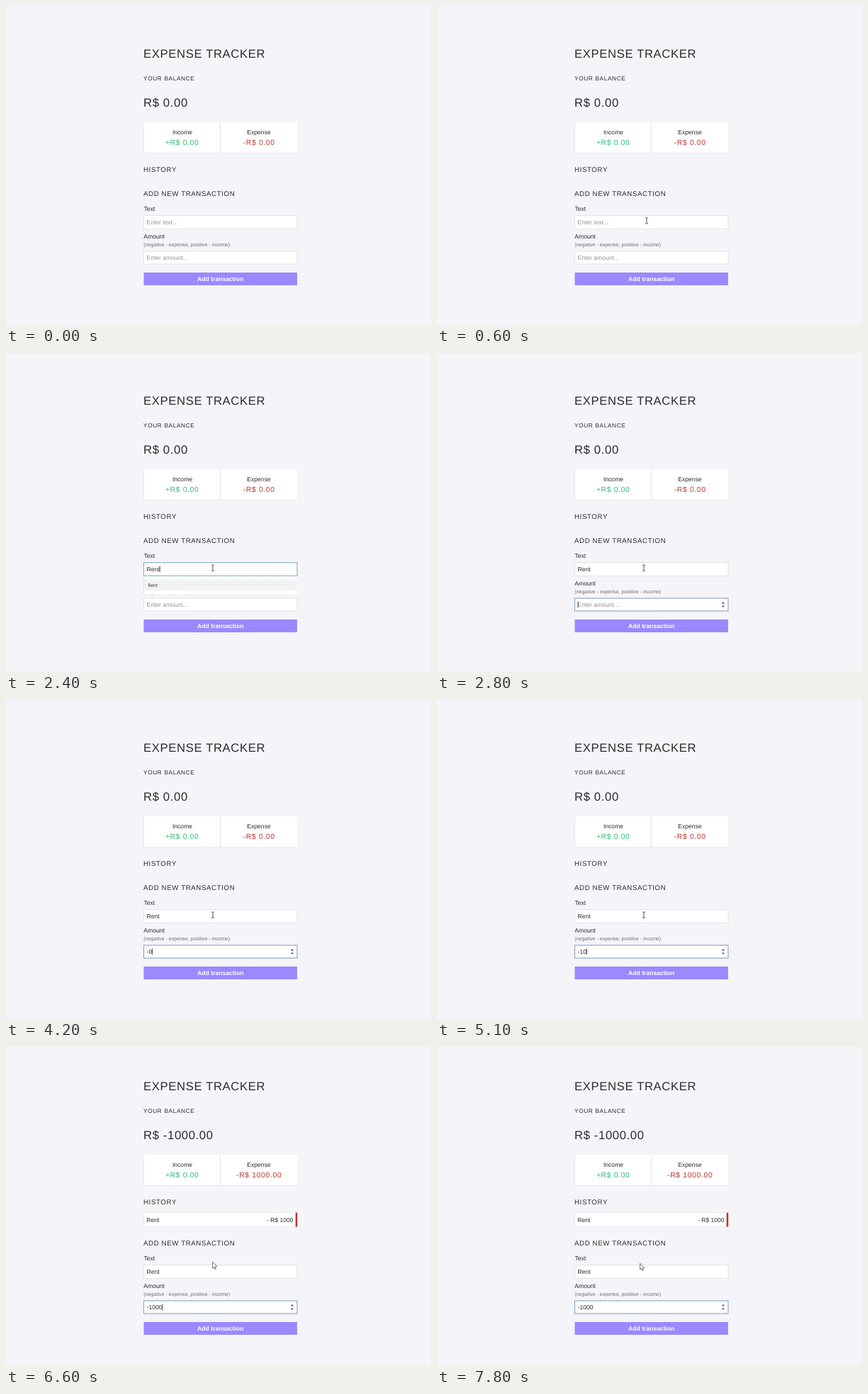
An HTML page for the animation above (8 s loop, 600 px wide and 450 px high).

```html
<!DOCTYPE html>
<html lang="en">
<head>
<meta charset="utf-8">
<title>Expense tracker</title>
<style>
  html, body { margin: 0; width: 100%; height: 100%; overflow: hidden; background: #f5f4f8; }
  svg { display: block; width: 600px; height: 450px; }
  text { font: 8.6px "Liberation Sans", Arial, sans-serif; fill: #2b2b2e; text-rendering: geometricPrecision; white-space: pre; }
  .big { font-size: 16.7px; letter-spacing: .62px; }
  .sub { font-size: 8.3px; letter-spacing: .62px; }
  .head { font-size: 9.68px; letter-spacing: .62px; }
  .money { font-size: 10.45px; letter-spacing: .62px; }
  .mid { text-anchor: middle; }
  .hint { font-size: 7.1px; fill: #6c6c70; }
  .box { fill: #fff; stroke: #dedde2; stroke-width: .8; }
  .empty { fill: #929297; font-size: 8.5px; }
  .card { fill: #fff; filter: drop-shadow(0 .7px .7px #0004); }
  .caret { stroke: #222; stroke-width: .8; }
</style>
</head>
<body>
<svg viewBox="0 0 600 450">
  <g id="top">
    <text class="big" x="194" y="73">EXPENSE TRACKER</text>
    <text class="sub" x="194" y="104.5">YOUR BALANCE</text>
    <text class="big" id="balance" x="194" y="141.5"></text>
    <rect class="card" x="194.5" y="164" width="216.5" height="43.5"/>
    <path d="M302.5 164v43.5" stroke="#e0dfe3" stroke-width=".8"/>
    <text class="mid" x="249" y="181">Income</text>
    <text class="mid money" x="248.7" y="195.5" style="fill:#2ebd70">+R$ 0.00</text>
    <text class="mid" x="357" y="181">Expense</text>
    <text class="mid money" id="expense" x="357.2" y="195.5" style="fill:#b8352f"></text>
    <text class="head" x="194" y="234">HISTORY</text>
  </g>
  <g id="item">
    <rect class="card" x="194.5" y="233.7" width="216.5" height="20"/>
    <path d="M410 233.7v20" stroke="#b8352f" stroke-width="2.5"/>
    <text x="198.3" y="246.8">Rent</text>
    <text x="405.5" y="246.8" text-anchor="end" style="font-size:8.5px">- R$ 1000</text>
  </g>
  <g id="form">
    <text class="head" x="194" y="268">ADD NEW TRANSACTION</text>
    <text x="194.5" y="288.8">Text</text>
    <rect class="box" id="nameBox" x="194.5" y="295.7" width="216.5" height="18.6"/>
    <text id="name" x="198.6" y="308"></text>
    <path class="caret" id="nameCaret"/>
    <text x="194.3" y="328">Amount</text>
    <text class="hint" x="194.3" y="339">(negative - expense, positive - income)</text>
    <rect class="box" id="sumBox" x="194.5" y="346" width="216.5" height="18"/>
    <text id="sum" x="198.6" y="358"></text>
    <path class="caret" id="sumCaret"/>
    <path id="spinner" d="M402 353.4l2-2.6 2 2.6zM402 356.4l2 2.6 2-2.6z" fill="#505055"/>
    <rect x="194.5" y="376" width="216.5" height="18" fill="#9c88ff"/>
    <text class="mid" x="302.8" y="387.8" style="fill:#fff;font-weight:bold">Add transaction</text>
    <g id="list">
      <rect class="card" x="194.5" y="315" width="216.5" height="25"/>
      <rect id="shade" x="195" y="318" width="215.5" height="18" fill="url(#grey)"/>
      <text x="200.2" y="329.8" style="font:6.5px 'Open Sans',sans-serif">Rent</text>
    </g>
  </g>
  <g id="beam" fill="none">
    <path d="M-2-4.2h1.4L0-3.6.6-4.2H2M0-3.6v7M-2 4h1.4L0 3.4.6 4H2" stroke="#3a3a3e" stroke-width=".9"/>
  </g>
  <path id="arrow" d="M0 0v9l2-1.8 1.4 3 1.4-.7L3.5 6.7l2.6-.3z" fill="#fff" stroke="#444" stroke-width=".8" stroke-linejoin="round"/>
  <linearGradient id="grey" x2="0" y2="1">
    <stop stop-color="#f7f7f8"/><stop offset=".5" stop-color="#efeff0"/><stop offset="1" stop-color="#f6f6f7"/>
  </linearGradient>
</svg>
<script>
const LOOP = 8000, STEP = 100, ADDED = 6600;
const el = id => document.getElementById(id);
const show = (id, on) => el(id).style.display = on ? '' : 'none';
const move = (id, x, y) => el(id).setAttribute('transform', `translate(${x} ${y})`);

const typedName = [[1800, 'R'], [2000, 'Re'], [2200, 'Ren'], [2300, 'Rent']];
const typedSum = [[3100, '-'], [3600, '-0'], [4700, '-'], [4800, '-1'], [5100, '-10'], [5500, '-100'], [5800, '-1000']];
const pointer = [[100, 562, 400], [400, 296, 304], [600, 296, 303], [800, 292, 303.3],
  [6500, 292, 303.3], [6600, 291.7, 303.3], [7300, 291.7, 303.3], [7800, 286.7, 305.2]];

const typed = (keys, t) => keys.reduce((text, [at, value]) => t >= at ? value : text, '');

function pointerAt(t) {
  const i = pointer.findIndex(p => p[0] > t);
  if (i < 0) return pointer.at(-1).slice(1);
  const [t0, x0, y0] = pointer[Math.max(i - 1, 0)], [t1, x1, y1] = pointer[i];
  const k = Math.max(0, (t - t0) / (t1 - t0));
  return [x0 + (x1 - x0) * k, y0 + (y1 - y0) * k];
}

function field(id, value, placeholder, focus, caretOn, y, color) {
  const text = el(id);
  text.textContent = value || placeholder;
  text.classList.toggle('empty', !value);
  el(id + 'Box').style.stroke = focus ? color : '';
  el(id + 'Box').style.strokeWidth = focus ? 1.1 : '';
  const x = 199 + (value ? text.getComputedTextLength() : 0);
  el(id + 'Caret').setAttribute('d', `M${x} ${y}v9`);
  show(id + 'Caret', focus && caretOn);
}

function draw(now) {
  const t = Math.floor(now % LOOP / STEP) * STEP;
  const added = t >= ADDED, shift = added ? 12 : 0;
  const onName = t >= 1000 && t < 2600, onSum = t >= 2600;

  move('top', 0, -shift);
  move('form', 0, shift);
  show('item', added);
  el('balance').textContent = added ? 'R$ -1000.00' : 'R$ 0.00';
  el('expense').textContent = added ? '-R$ 1000.00' : '-R$ 0.00';

  field('name', typed(typedName, t), 'Enter text...', onName, true, 300.5, '#86aeb9');
  field('sum', typed(typedSum, t), 'Enter amount...', onSum, t < 6900, 350.5, '#86a5c4');
  show('spinner', onSum);
  show('list', t >= 1000 && t < 2500);
  show('shade', t >= 2400);

  const inField = t >= 400 && !added, [x, y] = pointerAt(t);
  show('beam', inField);
  show('arrow', t >= 100 && !inField);
  move('beam', x, y);
  move('arrow', x, y);
}

const start = performance.now();
function tick() {
  draw(performance.now() - start);
  requestAnimationFrame(tick);
}
tick();
</script>
</body>
</html>
```
